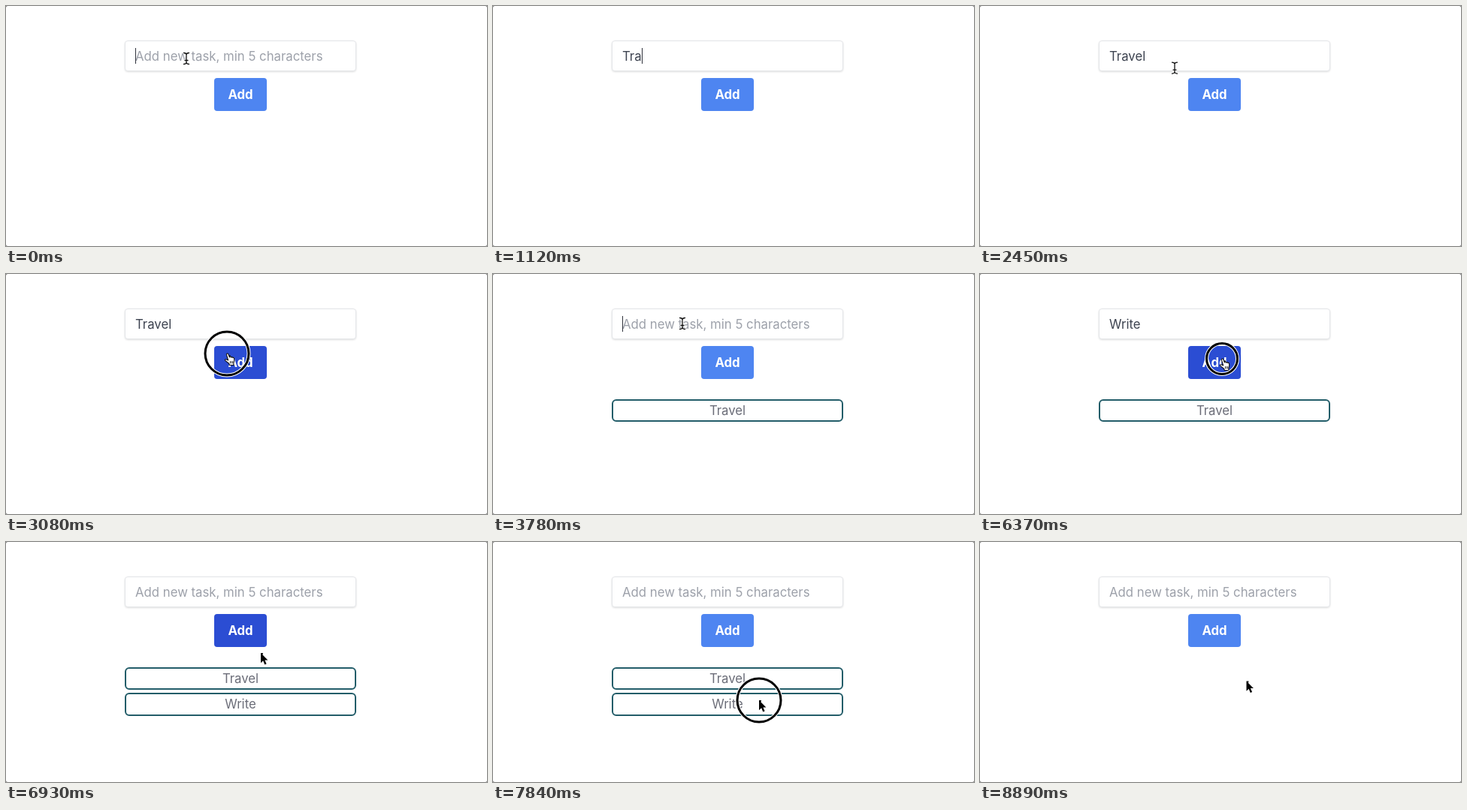
These frames come from a looping animation (640x320 px, 9.03 s). An HTML page:

```html
<!DOCTYPE html>
<html lang="en">
<head>
<meta charset="utf-8">
<title>Task list</title>
<style>
  html, body { margin: 0; width: 100%; height: 100%; overflow: hidden; background: #777; }
  svg { display: block; width: 640px; height: 320px; }
  text { font: 16.75px Inter, "Noto Sans", sans-serif; white-space: pre; }
  #hint { fill: #9da1aa; }
  #typed { fill: #3d4350; }
  #label { font-weight: 700; fill: #fff; text-anchor: middle; }
  .field { fill: #fff; stroke: #e3e5e8; filter: drop-shadow(0 1px 1px rgba(0, 0, 0, .13)); }
  .row rect { fill: #fff; stroke: #235d69; stroke-width: 2; }
  .row text { fill: #6b6d78; text-anchor: middle; }
  #ring circle { fill: none; }
</style>
</head>
<body>
<svg viewBox="0 0 640 320">
  <rect width="640" height="320" rx="2.5" fill="#fff"/>

  <rect class="field" x="158.5" y="46.5" width="307" height="40" rx="3.5"/>
  <text id="hint" x="172" y="73">Add new task, min 5 characters</text>
  <text id="typed" x="172" y="73"></text>
  <rect id="caret" y="56" width="1" height="21" fill="#30333c"/>

  <rect id="button" x="277" y="96" width="70" height="44" rx="4"/>
  <text id="label" x="312" y="124">Add</text>

  <g class="row" id="travel">
    <rect x="159" y="168" width="306" height="28" rx="5"/>
    <text x="312" y="188">Travel</text>
  </g>
  <g class="row" id="write">
    <rect x="159" y="202" width="306" height="29" rx="5"/>
    <text x="312" y="222">Write</text>
  </g>

  <g id="cursor">
    <g id="ibeam" fill="none" stroke-linecap="round">
      <path d="M-3.5-7.5Q-.5-7.5 0-5.5Q.5-7.5 3.5-7.5M0-5.5V5.5M-3.5 7.5Q-.5 7.5 0 5.5Q.5 7.5 3.5 7.5M-2 2.5H2" stroke="#fff" stroke-width="3"/>
      <path d="M-3.5-7.5Q-.5-7.5 0-5.5Q.5-7.5 3.5-7.5M0-5.5V5.5M-3.5 7.5Q-.5 7.5 0 5.5Q.5 7.5 3.5 7.5M-2 2.5H2" stroke="#111" stroke-width="1.3"/>
    </g>
    <path id="arrow" d="M0 0V13.2L3-.0V0L0 0V13.2L3.1 10.3L5.3 15.4L7.6 14.4L5.4 9.5H9.4Z" fill="#000" stroke="#fff" stroke-width="1.4" stroke-linejoin="round" paint-order="stroke"/>
    <g id="hand" stroke-linejoin="round" stroke-linecap="round">
      <path d="M-.6 1.4C-.8-.1 1.2-.6 1.8.9L3.4 5C4-.0 4 4 5.1 4.6L5.6 5.3C6.3 4.2 7.4 4.5 7.7 5.7C8.6 5 9.5 5.5 9.6 6.8C9.9 9 9.8 10.4 8.9 12.4V15.5H3.3L2.6 13.2L-2.1 9.6C-3.2 8.3-1.8 7.2-.6 8L1.6 9Z" fill="#fff" stroke="#111" stroke-width="1.1"/>
      <path d="M4.4 10.5V13M6.1 10.5V13M7.8 10.5V13" fill="none" stroke="#111" stroke-width=".8"/>
    </g>
  </g>
  <g id="ring">
    <circle stroke="#fff" stroke-width="5"/>
    <circle stroke="#000" stroke-width="3"/>
  </g>
</svg>
<script>
  const LOOP = 9030, STEP = 70;
  const $ = id => document.getElementById(id);
  const show = (id, on) => { $(id).style.display = on ? '' : 'none'; };
  const within = (t, spans) => spans.some(([a, b]) => t >= a && t < b);

  // time, x, y of the pointer's hot spot
  const path = [
    [0, 240, 70], [2170, 240, 70], [2870, 294, 106], [3220, 294, 106],
    [3780, 252, 66], [5670, 250, 66], [6230, 322, 113], [6720, 322, 113],
    [6930, 339, 148], [7280, 353, 216], [7420, 354, 211], [7980, 354, 211],
    [8470, 354.5, 185.5], [LOOP, 354.5, 185.5]
  ];
  const typing = [
    [770, 'T'], [910, 'Tr'], [1120, 'Tra'], [1400, 'Trav'], [1610, 'Trave'],
    [1890, 'Travel'], [3220, ''], [4200, 'W'], [4550, 'Wr'], [4830, 'Wri'],
    [5110, 'Writ'], [5460, 'Write'], [6580, '']
  ];
  const carets = [[0, 490], [770, 2380], [2870, 3010], [3780, 6020]];
  const clicks = [[3010, 3220], [6370, 6580], [7700, 7910], [8820, 8890]];
  const hidden = [[770, 2170], [4200, 5740]];

  function pointer(t) {
    const i = path.findIndex(p => p[0] > t);
    const [t0, x0, y0] = path[i - 1], [t1, x1, y1] = path[i];
    const u = (t - t0) / (t1 - t0), e = u * u * (3 - 2 * u);
    return [x0 + (x1 - x0) * e, y0 + (y1 - y0) * e];
  }

  function draw(t) {
    const [x, y] = pointer(t);
    const word = typing.reduce((w, [at, s]) => t >= at ? s : w, '');
    const visible = !within(t, hidden);
    const overInput = y < 88;
    const overButton = x > 277 && x < 347 && y > 96 && y < 140;

    $('typed').textContent = word;
    show('hint', !word);
    show('caret', within(t, carets));
    $('caret').setAttribute('x', 172 + Math.round(word ? $('typed').getComputedTextLength() : 0));

    const dark = visible && overButton || within(t, [[6790, 7000]]);
    $('button').setAttribute('fill', dark ? '#2b4dd3' : '#4e85f1');
    show('travel', t >= 3220 && t < 8890);
    show('write', t >= 6580 && t < 7910);

    show('cursor', visible);
    $('cursor').setAttribute('transform', `translate(${x} ${y})`);
    show('ibeam', overInput);
    show('hand', overButton);
    show('arrow', !overInput && !overButton);

    const click = clicks.find(c => within(t, [c]));
    show('ring', click);
    if (click) {
      $('ring').setAttribute('transform', `translate(${x} ${y})`);
      const r = t - click[0] < STEP ? 20.5 : 29;
      for (const c of $('ring').children) c.setAttribute('r', r);
    }
  }

  const start = performance.now();
  function tick() {
    const t = (performance.now() - start) % LOOP;
    draw(Math.floor(t / STEP) * STEP);
    requestAnimationFrame(tick);
  }
  tick();
</script>
</body>
</html>
```
